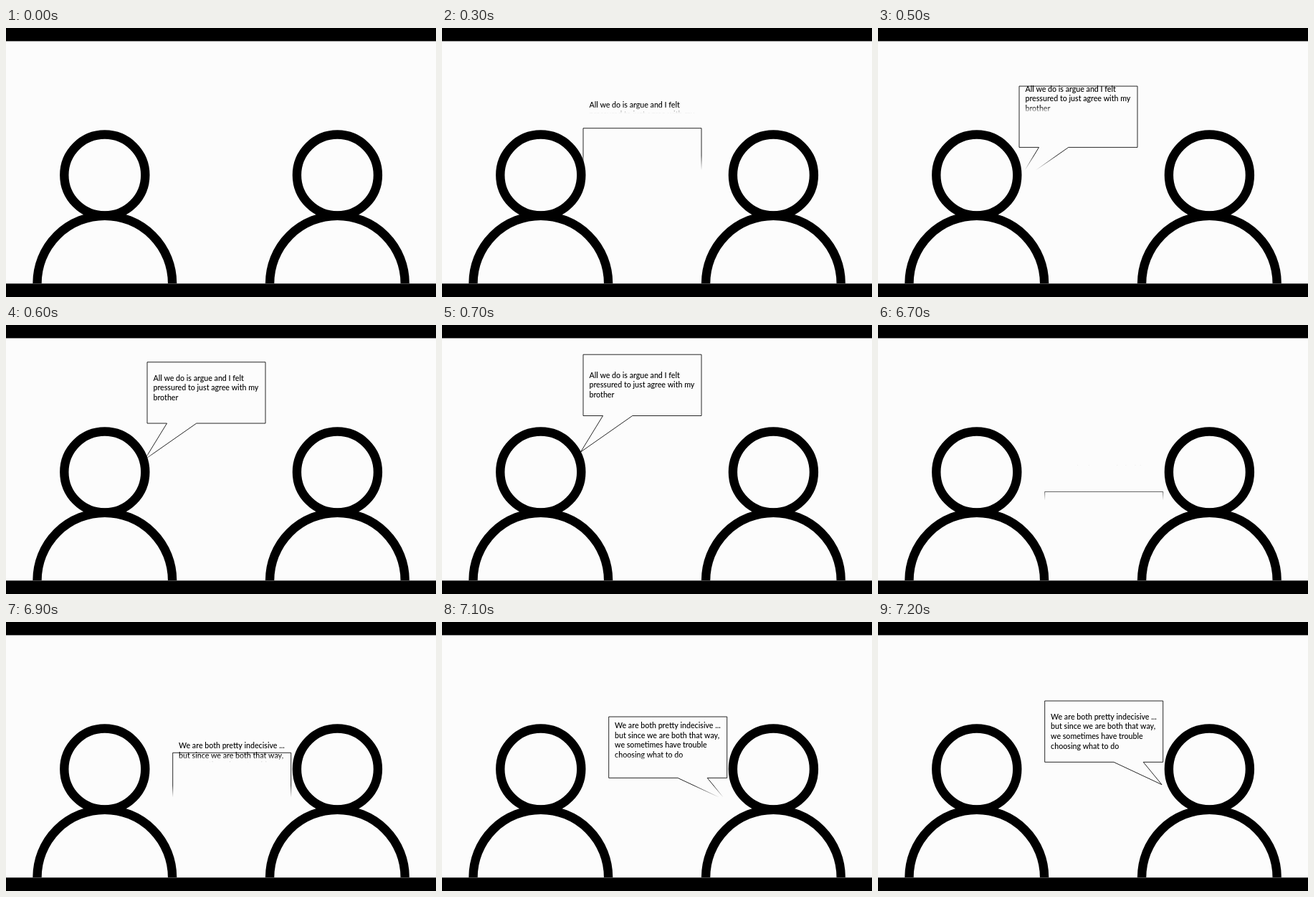
An HTML page with a canvas for the animation above (8000 ms loop, 600 px wide and 375 px high).

```html
<!DOCTYPE html>
<html lang="en">
<head>
<meta charset="utf-8">
<title>Conversation</title>
<style>
  html, body { margin: 0; width: 100%; height: 100%; overflow: hidden; background: #fcfcfc; }
  canvas { display: block; width: 600px; height: 375px; }
</style>
</head>
<body>
<canvas id="stage"></canvas>
<script>
const W = 600, H = 375, LOOP = 8000, STEP = 100, RISE = 532;
const BOX_W = 165, BOX_H = 85.3, LINE = 13.65;

const canvas = document.getElementById('stage');
const ctx = canvas.getContext('2d');
const ratio = window.devicePixelRatio || 1;
canvas.width = W * ratio;
canvas.height = H * ratio;

// tail: where the base starts and ends, in twelfths of the box width
const bubbles = [
  {
    start: 104, end: 5500, x: 197, y: 41.2, tail: [2, 5], tip: [193.5, 177],
    travel: 156, baseline: 73.6, textBottom: 109, textTravel: 58.5,
    lines: ['All we do is argue and I felt', 'pressured to just agree with my', 'brother']
  },
  {
    start: 6656, end: LOOP, x: 232.7, y: 110, tail: [7, 10], tip: [396, 226.7],
    travel: 133.5, baseline: 135.8, textBottom: 186, textTravel: 74,
    lines: ['We are both pretty indecisive ...', 'but since we are both that way,',
            'we sometimes have trouble', 'choosing what to do']
  }
];

// black that fades out below the resting bottom edge
function fade(bottom, size) {
  const g = ctx.createLinearGradient(0, bottom, 0, bottom + size);
  g.addColorStop(0, 'rgba(0,0,0,1)');
  g.addColorStop(1, 'rgba(0,0,0,0)');
  return g;
}

function drawPerson(x) {
  ctx.strokeStyle = '#000';
  ctx.lineWidth = 12.4;
  ctx.beginPath();
  ctx.arc(x, 205, 56.5, 0, Math.PI * 2);
  ctx.stroke();
  ctx.beginPath();
  ctx.arc(x, 356, 94.3, Math.PI, Math.PI * 2);
  ctx.stroke();
}

function drawBubble(b, t) {
  const p = (t - b.start) / RISE;
  if (p < 0 || t >= b.end) return;
  const left = Math.max(0, 1 - p);

  const dy = left * b.travel;
  const top = b.y + dy, bottom = top + BOX_H, right = b.x + BOX_W;
  const [from, to] = b.tail.map(k => b.x + BOX_W * k / 12);
  ctx.strokeStyle = fade(b.tip[1] + 1, b.y + b.travel - b.tip[1]);
  ctx.lineWidth = 0.85;
  ctx.beginPath();
  ctx.moveTo(b.x, top);
  ctx.lineTo(right, top);
  ctx.lineTo(right, bottom);
  ctx.lineTo(to, bottom);
  ctx.lineTo(b.tip[0], b.tip[1] + dy);
  ctx.lineTo(from, bottom);
  ctx.lineTo(b.x, bottom);
  ctx.closePath();
  ctx.stroke();

  const base = b.baseline + left * b.textTravel;
  ctx.fillStyle = fade(b.textBottom, 10);
  ctx.font = '500 10.65px Lato, Carlito, sans-serif';
  b.lines.forEach((s, i) => ctx.fillText(s, b.x + 8.4, base + i * LINE));
}

function draw(t) {
  ctx.setTransform(ratio, 0, 0, ratio, 0, 0);
  ctx.fillStyle = '#fcfcfc';
  ctx.fillRect(0, 0, W, H);
  drawPerson(137.8);
  drawPerson(462.4);
  bubbles.forEach(b => drawBubble(b, t));
  ctx.fillStyle = '#000';
  ctx.fillRect(0, 0, W, 18.4);
  ctx.fillRect(0, 356.3, W, H);
}

const begin = performance.now();
function tick() {
  const t = (performance.now() - begin) % LOOP;
  draw(Math.floor(t / STEP) * STEP);
  requestAnimationFrame(tick);
}
tick();
</script>
</body>
</html>
```
